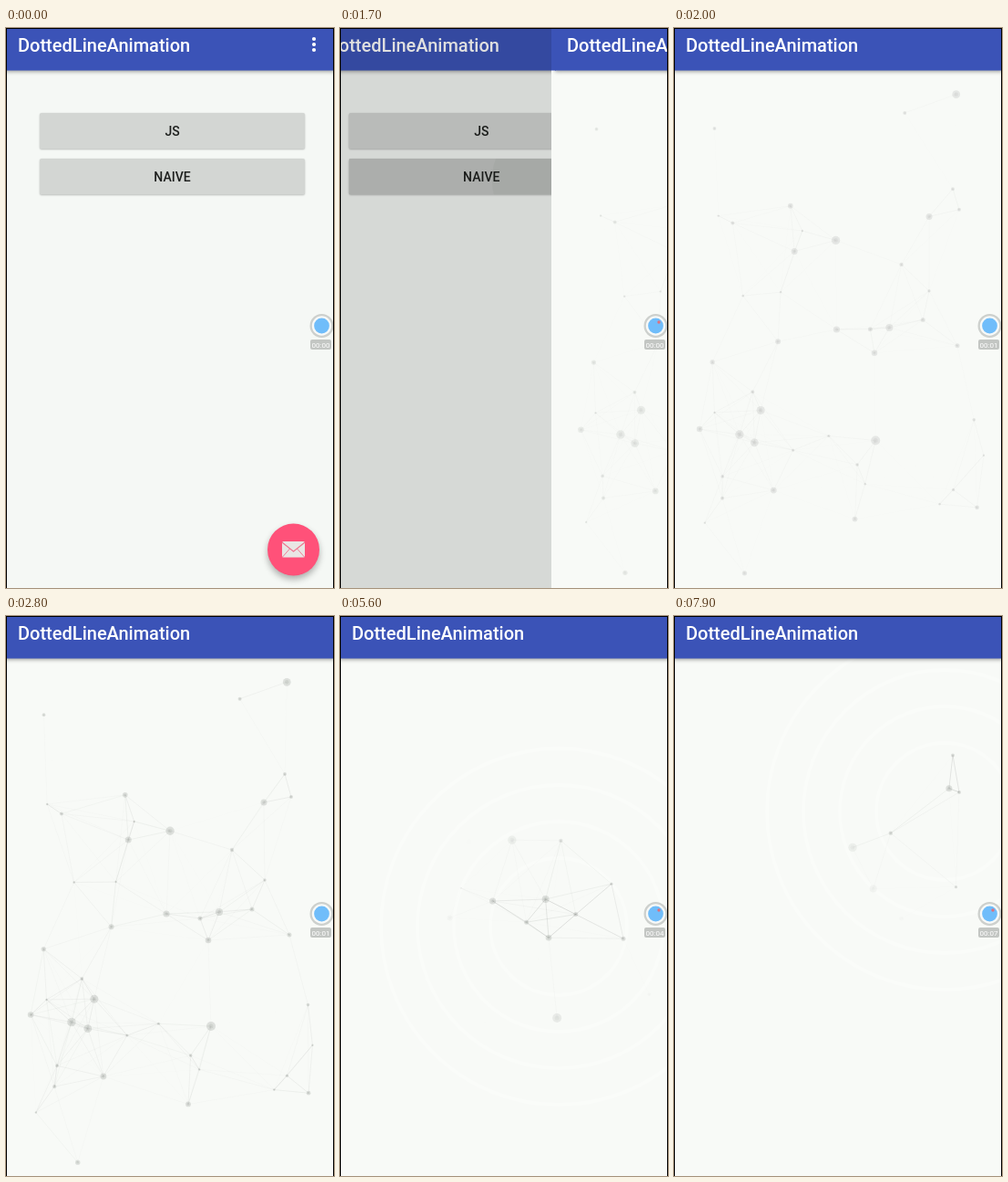
These frames come from a looping animation (360 by 613 pixels, 8000 ms). An HTML page with a canvas:

```html
<!DOCTYPE html>
<html lang="en">
<head>
<meta charset="utf-8">
<title>DottedLineAnimation</title>
<style>
html, body { margin: 0; width: 100%; height: 100%; overflow: hidden; background: #f8faf7; }
canvas { display: block; width: 360px; height: 613px; }
</style>
</head>
<body>
<canvas id="stage"></canvas>
<script>
const W = 360, H = 613, LOOP = 8000, STEP = 100;
const TAP = 1600;  // ripple, then the second page slides in
const BASE = 2800; // time at which the dots hold their start places
const REACH = 115; // longest link between two dots

const canvas = document.getElementById('stage');
const ctx = canvas.getContext('2d');
const dpr = window.devicePixelRatio || 1;
canvas.width = W * dpr;
canvas.height = H * dpr;

let seed = 29;
const rand = () => (seed = seed * 16807 % 2147483647) / 2147483647;
const clamp = v => Math.max(0, Math.min(1, v));
const lerp = (a, b, k) => a + (b - a) * k;
const smooth = v => (v = clamp(v), v * v * (3 - 2 * v));

// the spot around which dots stay visible
function focus(t) {
  const k = clamp((t - 5600) / 2300);
  return { x: lerp(240, 297, k), y: lerp(340, 214, k) };
}
const distTo = (p, q) => Math.hypot(p.x - q.x, p.y - q.y);

// key dots of the cluster; drift in px per second
const dot = (x, y, r, vx, vy) => ({ x, y, r, vx, vy });
const dots = [
  dot(176, 326, 3.6, -3, -5), dot(234, 324, 4, -3, -5),
  dot(213, 331, 2.5, -3, 1.5), dot(270, 321, 2.5, -4, 2),
  dot(222, 355, 3.3, 2.5, -1), dot(311, 349, 2.5, 0, 1.5),
  dot(284, 289, 1.7, 5, 1.5), dot(248, 256, 2.2, -2, -3.6),
  dot(283, 204, 3.5, 3.7, -3), dot(306, 173, 2, 0, -4),
  dot(313, 198, 2, 0, -1), dot(225, 449, 5, 4.7, -3.2)
];
// the rest is scattered around it, denser at the lower left
while (dots.length < 46) {
  const y = 70 + 535 * Math.pow(rand(), .65);
  const x = 25 + 330 * Math.pow(rand(), .6 + y / 500);
  const p = dot(x, y, 1.2 + 3.8 * rand() ** 2, 9 * rand() - 4.5, 9 * rand() - 4.5);
  const clear = [BASE, LOOP].every(t => distTo(p, focus(t)) > 118);
  if (clear && dots.every(q => distTo(p, q) > 18)) dots.push(p);
}

function box(x, y, w, h, color, r = 0) {
  ctx.fillStyle = color;
  ctx.beginPath();
  ctx.roundRect(x, y, w, h, r);
  ctx.fill();
}

function disc(x, y, r, color) {
  ctx.fillStyle = color;
  ctx.beginPath();
  ctx.arc(x, y, r, 0, Math.PI * 2);
  ctx.fill();
}

function stroke(color, width, ...pts) {
  ctx.strokeStyle = color;
  ctx.lineWidth = width;
  ctx.beginPath();
  pts.forEach(([x, y]) => ctx.lineTo(x, y));
  ctx.stroke();
}

function label(text, x, y, size, color, align = 'left', weight = 500) {
  ctx.font = `${weight} ${size}px Roboto, sans-serif`;
  ctx.textAlign = align;
  ctx.fillStyle = color;
  ctx.fillText(text, x, y);
}

function withShadow(alpha, blur, dy, paint) {
  ctx.save();
  ctx.shadowColor = `rgba(0,0,0,${alpha})`;
  ctx.shadowBlur = blur * dpr;
  ctx.shadowOffsetY = dy * dpr;
  paint();
  ctx.restore();
}

function header() {
  withShadow(.35, 4, 1, () => box(0, 0, W, 46.5, '#3b53b7'));
  label('DottedLineAnimation', 13, 26, 20, '#fff');
}

function button(text, y, sinceTap = -1) {
  withShadow(.25, 2, .8, () => box(37, y, 291, 39.3, '#d3d6d3', 2));
  if (sinceTap >= 0) {
    ctx.save();
    ctx.beginPath();
    ctx.rect(37, y, 291, 39.3);
    ctx.clip();
    box(37, y, 291, 39.3, `rgba(0,0,0,${.07 * clamp(sinceTap / 100)})`);
    disc(259, 166, 40 + sinceTap * .25, `rgba(0,0,0,${Math.max(.02, .055 - sinceTap * .00025)})`);
    ctx.restore();
  }
  label(text, 182.5, y + 25, 14, '#1d1f1d', 'center');
}

function mailButton() {
  withShadow(.3, 7, 4, () => disc(315.5, 571, 28.5, '#ff5179'));
  box(303, 562, 25, 17.5, '#e9e6e4', 1.5);
  const line = '#f0748f';
  stroke(line, 1.2, [303, 563], [315.5, 573], [328, 563]);
  stroke(line, .9, [303.5, 579], [311.5, 570]);
  stroke(line, .9, [327.5, 579], [319.5, 570]);
}

function home(t) {
  box(0, 0, W, H, '#f5f8f5');
  header();
  for (let i = 0; i < 3; i++) disc(338, 12 + 6 * i, 2.1, '#fff');
  button('JS', 93);
  button('NAIVE', 143, t - TAP);
  mailButton();
}

function network(t) {
  const veil = smooth((t - BASE) / 1700);
  const center = focus(t);
  const ink = lerp(.55, 1, clamp((t - 1700) / 1000));
  const s = (t - BASE) / 1000;
  const pts = dots.map(d => {
    const p = { x: d.x + d.vx * s, y: d.y + d.vy * s, r: d.r };
    const near = 1 - smooth((distTo(p, center) - 68) / 72);
    p.a = lerp(1, near, veil);
    return p;
  });

  ctx.strokeStyle = `rgba(255,255,255,${.25 * veil})`;
  ctx.lineWidth = 4;
  for (let r = 75; r < 200; r += 40) {
    ctx.beginPath();
    ctx.arc(center.x, center.y, r, 0, Math.PI * 2);
    ctx.stroke();
  }

  const strength = lerp(.16, .3, veil) * ink * ink;
  pts.forEach((p, i) => {
    for (const q of pts.slice(i + 1)) {
      const a = (1 - distTo(p, q) / REACH) * strength * p.a * q.a;
      if (a > .004) stroke(`rgba(90,95,90,${a})`, .7, [p.x, p.y], [q.x, q.y]);
    }
  });
  pts.forEach(p => {
    disc(p.x, p.y, p.r, `rgba(90,95,90,${.17 * p.a * ink})`);
    disc(p.x, p.y, p.r * .5, `rgba(90,95,90,${.1 * p.a * ink})`);
  });
}

function linesPage(t) {
  box(-4, 0, W + 4, H, '#f8faf7');
  network(t);
  header();
  box(-4, 0, 5, 46.5, '#3b53b7');
}

function recorder(t) {
  const sec = Math.max(0, Math.floor((t - 850) / 1000));
  disc(346.5, 326, 13, '#cdd0cd');
  disc(346.5, 326, 10.7, '#f7f9f8');
  disc(346.5, 326, 8.4, '#70bdfa');
  if (t >= 1000 && sec !== 1) disc(350, 322, 1.7, '#e0707c');
  box(334, 341, 23, 11, '#c3c6c3', 2);
  label('00:0' + sec, 345.5, 349.7, 8, '#fff', 'center', 400);
}

function draw(t) {
  ctx.setTransform(dpr, 0, 0, dpr, 0, 0);
  const shown = t > TAP ? smooth((t - TAP + 15) / 291) : 0;
  if (shown < 1) {
    ctx.save();
    ctx.translate(-86 * shown ** 1.08, 0);
    home(t);
    ctx.restore();
    box(0, 0, W, H, `rgba(0,0,0,${.36 * shown})`);
  }
  if (shown > 0) {
    ctx.save();
    ctx.translate(Math.round(W * (1 - shown)), 0);
    linesPage(t);
    ctx.restore();
  }
  recorder(t);
  box(0, 0, W, 1, '#000');
  box(0, 0, 1, H, '#000');
  box(W - 1, 0, 1, H, '#000');
}

const start = performance.now();
function frame() {
  const t = (performance.now() - start) % LOOP;
  draw(Math.floor(t / STEP) * STEP);
  requestAnimationFrame(frame);
}
frame();
</script>
</body>
</html>
```
